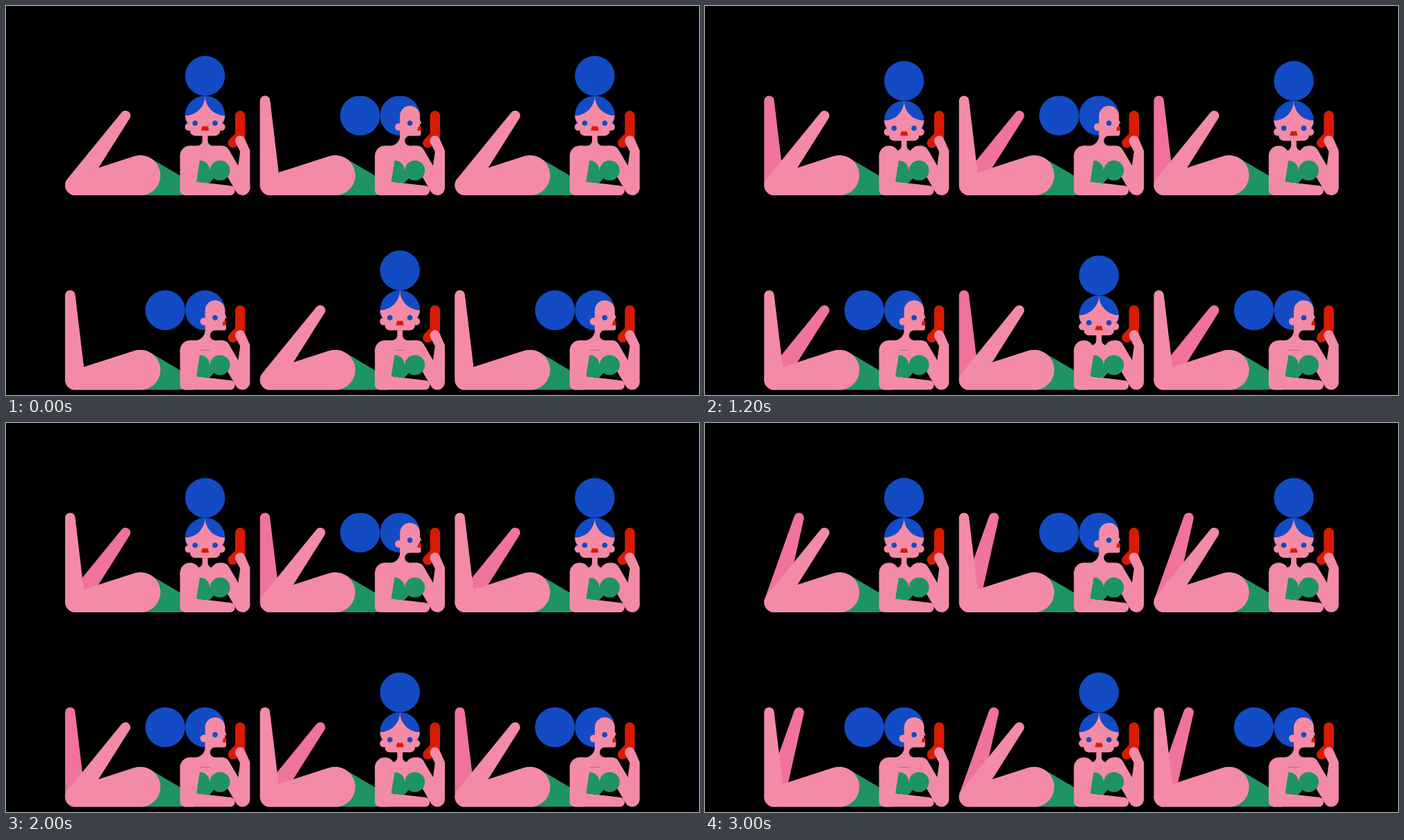
An HTML page with a canvas for the animation above (3200 ms loop, 998 px wide and 561 px high).

```html
<!DOCTYPE html>
<html lang="en">
<head>
<meta charset="utf-8">
<title>Lounging figures</title>
<style>
html, body { margin: 0; width: 100%; height: 100%; overflow: hidden; background: #000; }
canvas { display: block; width: 998px; height: 561px; }
</style>
</head>
<body>
<canvas id="stage" width="998" height="561"></canvas>
<script>
const ctx = document.getElementById('stage').getContext('2d');
const PINK = '#f38ba6', ROSE = '#f0739c', BLUE = '#134bc4', GREEN = '#1e9463', RED = '#d81b00';
const CELL = 280.6, STEP = 200, PI = Math.PI;
const U = 7.2, BIG = 28.7, CX = 286.7;

// Leg swing: 0 upright, 1 half way, 2 lowered
const SWING = [2, 1, 0, 0, 0, 1, 2, 2];
const LEGS = [
  { tip: [92.4, 136.6], crotch: [112, 240.2] },
  { tip: [135.4, 136.6], crotch: [120, 237.6] },
  { tip: [172, 158.2], crotch: [133, 233.4] }
];
const KNEE = [99.6, 258.6], HIP = [193.5, 244.2];

function shape(color, d) {
  ctx.fillStyle = color;
  ctx.fill(new Path2D(d));
}

function disc(color, x, y, r) {
  ctx.fillStyle = color;
  ctx.beginPath();
  ctx.arc(x, y, r, 0, 2 * PI);
  ctx.fill();
}

function bar(color, width, d) {
  ctx.strokeStyle = color;
  ctx.lineWidth = width;
  ctx.lineCap = ctx.lineJoin = 'round';
  ctx.stroke(new Path2D(d));
}

function leg(color, pose) {
  const { tip, crotch } = LEGS[pose];
  const dx = tip[0] - KNEE[0], dy = tip[1] - KNEE[1];
  const side = Math.atan2(dy, dx) - Math.acos(U / Math.hypot(dx, dy));
  ctx.fillStyle = color;
  ctx.beginPath();
  ctx.arc(...KNEE, 2 * U, PI / 2, side + 2 * PI);
  ctx.arc(...tip, U, side, side + PI);
  ctx.lineTo(...crotch);
  ctx.arc(...HIP, 28.8, Math.atan2(-0.952, -0.305), PI / 2);
  ctx.fill();
}

function body() {
  shape(PINK, 'M257.8 273A7.2 7.2 0 0 1 250.6 265.8V216H322L312 237H279L276 257L270 273Z');
  disc(PINK, 265, 216, 14.4);
  disc(PINK, 308.4, 216, 14.4);
  bar(PINK, 21.5, 'M311.5 212.4L340.7 262.2');
  shape(PINK, 'M257 251.3L324 259.3A6.9 6.9 0 0 1 323 273H257Z');
  shape(GREEN, 'M279 222.8A14.4 14.4 0 0 1 293.4 237L300 248L293 255.6L274.2 253.4Z');
  disc(GREEN, 308.2, 237.2, 14.4);
}

function arm() {
  bar(RED, 14.4, 'M337.2 158.3V187L326.8 197.5');
  disc(PINK, 337.2, 194.2, U);
  shape(PINK, 'M343.6 190.8L351.4 208.5V262H330L337.2 210L330.7 197.3Z');
}

function frontHead(drop) {
  ctx.save();
  ctx.translate(0, drop);
  const left = drop ? 274 : 265, right = drop ? 299.4 : 308.4;
  shape(PINK, `M${left} 216V201.6H275.6A7.2 7.2 0 0 0 282.8 194.4V185H290.6V194.4A7.2 7.2 0 0 0 297.8 201.6H${right}V216Z`);
  disc(BLUE, CX, 100.7, BIG);
  disc(BLUE, CX, 158.1, BIG);
  shape(PINK, 'M286.7 129.4A28.7 28.7 0 0 0 315.4 158.1Q315 166 308.4 172V180A7.2 7.2 0 0 1 301.2 187.2H272.2A7.2 7.2 0 0 1 265 180V172Q258.4 166 258 158.1A28.7 28.7 0 0 0 286.7 129.4Z');
  for (const s of [-1, 1]) {
    disc(PINK, CX + s * 23.6, 174.4, 5.4);
    disc(BLUE, CX + s * 14.4, 169, 3.8);
  }
  shape(RED, 'M281.2 179.8Q282 173 284.4 173Q286 173 286.7 174.6Q287.4 173 289 173Q291.4 173 292.2 179.8Z');
  ctx.restore();
}

function sideHead() {
  disc(BLUE, 229.3, 158.1, BIG);
  disc(BLUE, CX, 158.1, BIG);
  shape(PINK, 'M265 216V201.6H272.3A14.4 14.4 0 0 0 286.7 187.2V158.4A14.4 14.4 0 0 1 315.5 158.4V164L317.8 169.8H315.5V173L317 180V184.2A3 3 0 0 1 314 187.2H301A7.2 7.2 0 0 0 301 201.6H308.4V216Z');
  disc(PINK, 285, 174.4, 5.4);
  disc(BLUE, 301.1, 169, 3.8);
  shape(RED, 'M311.8 179.8Q312.6 173 315 173Q316.6 173 317.3 174.6V179.8Z');
}

function figure(front, k) {
  const phase = front ? k : k + 4;
  shape(GREEN, 'M193.5 273L208 219.4L254 246.6V273Z');
  leg(ROSE, SWING[(phase + 6) % 8]);
  leg(PINK, SWING[phase % 8]);
  body();
  if (front) frontHead(k & 2 ? U : 0);
  else sideHead();
  arm();
}

function draw() {
  const k = Math.floor(performance.now() / STEP) % 8;
  ctx.fillStyle = '#000';
  ctx.fillRect(0, 0, 998, 561);
  for (let i = 0; i < 6; i++) {
    const col = i % 3, row = Math.floor(i / 3);
    ctx.save();
    ctx.translate(col * CELL, row * CELL);
    figure((col + row) % 2 === 0, k);
    ctx.restore();
  }
  requestAnimationFrame(draw);
}
draw();
</script>
</body>
</html>
```
